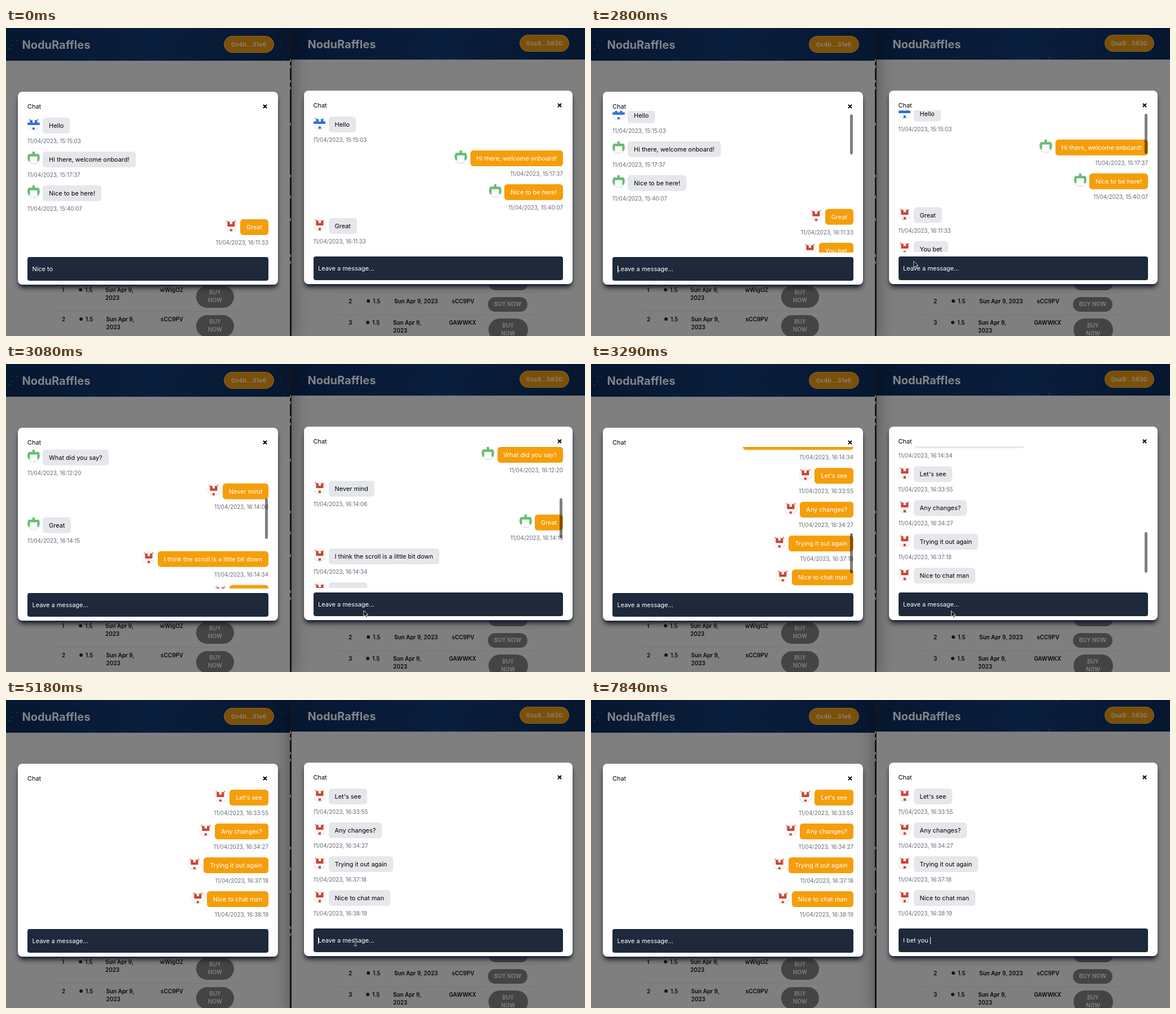
Animation of 1026 by 546 pixels, one loop 8 s. Source, as an HTML page with a canvas:

```html
<!DOCTYPE html>
<html lang="en">
<head>
<meta charset="utf-8">
<title>Chat in two windows</title>
<style>
html, body { margin: 0; width: 100%; height: 100%; overflow: hidden; }
body { position: relative; background: #1d1d1f; font: 10.93px/20px Inter, "Open Sans", sans-serif; color: #000; }
div, svg, canvas { position: absolute; }
.window { top: 0; height: 546px; overflow: hidden; background: #7f7f7f; box-shadow: 0 0 10px rgba(0,0,0,.25); }
.active { z-index: 1; box-shadow: 0 8px 32px rgba(0,0,0,.45); }
.text { white-space: pre; }
.brand { font-size: 20px; font-weight: 700; color: #828488; }
.wallet { box-sizing: border-box; height: 30px; border: 1px solid #80693f; border-radius: 15px; background: #7c5006;
  color: #828282; font-weight: 600; line-height: 28px; text-align: center; }
.cell { font-size: 9.9px; font-weight: 600; line-height: 14px; color: #080808; }
.coin { width: 6px; height: 6px; border-radius: 50%; background: #151515; }
.buy { border-radius: 20px; background: #444; color: #828282; font-size: 9.8px; font-weight: 600; line-height: 14px;
  display: flex; align-items: center; justify-content: center; text-align: center; white-space: pre; }
.rule { height: 1px; background: #777; }
.panel { height: 342.5px; border-radius: 8px; background: #fff;
  box-shadow: 0 7px 10px -2px #111a2e, 0 3px 5px -3px #111a2e; }
.list { left: 17px; top: 34.5px; height: 251px; overflow: hidden; }
.rows { left: 0; top: 11.5px; width: 100%; }
.row { left: 0; width: 100%; height: 60px; }
.line { left: 0; top: 0; display: flex; gap: 5.4px; }
.own .line, .own .time { left: auto; right: 0; }
.line svg { position: static; border-radius: 50%; box-shadow: 0 1px 2px rgba(0,0,0,.2); flex: none; }
.bubble { position: static; padding: 0 10.9px; border-radius: 5.4px; background: #e5e7eb; line-height: 28px; white-space: pre; }
.own .bubble { background: #f59e0b; color: #fff; }
.time { left: 0; top: 31px; font-size: 9.83px; color: #666b74; white-space: pre; }
.thumb { right: 1.5px; width: 5px; height: 71.5px; border-radius: 3px; background: rgba(0,0,0,.5); }
.field { left: 17px; top: 293.5px; height: 42px; border-radius: 4px; background: #1e293b; color: #fff;
  line-height: 42px; white-space: pre; padding-left: 8.5px; box-sizing: border-box; }
.caret { display: inline-block; position: static; width: 1px; height: 13px; margin-right: -1px; vertical-align: -3px; background: #fff; }
.scrap { z-index: 2; left: 503px; width: 2px; background: #6c6c6f; }
#pointer { z-index: 3; left: -12px; top: -12px; overflow: visible; }
</style>
</head>
<body>
<script>
const LOOP = 8000, STEP = 70, PITCH = 60, MAX_SCROLL = 9 * PITCH;
const SEND = 2730, FOCUS = 4410;
const PLACEHOLDER = 'Leave a message...';

const ICONS = {
  blue: ['#2f6fd6', 'X...X .X.X. XXXXX ..... ..X..'],
  green: ['#67bd70', '..X.. XXXXX X...X X...X .....'],
  red: ['#cc4433', 'X...X .X.X. .XXX. ..... ..X..']
};

const MESSAGES = [
  ['blue', 'Hello', '15:15:03'],
  ['green', 'Hi there, welcome onboard!', '15:17:37'],
  ['green', 'Nice to be here!', '15:40:07'],
  ['red', 'Great', '16:11:33'],
  ['red', 'You bet', '16:11:48'],
  ['green', 'What did you say?', '16:12:20'],
  ['red', 'Never mind', '16:14:06'],
  ['green', 'Great', '16:14:15'],
  ['red', 'I think the scroll is a little bit down', '16:14:34'],
  ['red', "Let's see", '16:33:55'],
  ['red', 'Any changes?', '16:34:27'],
  ['red', 'Trying it out again', '16:37:18'],
  ['red', 'Nice to chat man', '16:38:19']
];

function add(parent, cls, style = {}, text = '') {
  const el = document.createElement('div');
  el.className = cls;
  for (const [key, value] of Object.entries(style))
    el.style[key] = typeof value === 'number' ? value + 'px' : value;
  el.textContent = text;
  parent.append(el);
  return el;
}

function avatar(kind) {
  const [color, rows] = ICONS[kind];
  let path = '';
  rows.split(' ').forEach((row, y) => [...row].forEach((c, x) => {
    if (c === 'X') path += `M${x} ${y}h1v1h-1z`;
  }));
  return `<svg width="21.8" height="21.8" viewBox="0 0 5 5"><rect width="5" height="5" fill="#fafafa"/><path d="${path}" fill="${color}"/></svg>`;
}

function sky(parent, width, height, seed) {
  const canvas = document.createElement('canvas');
  canvas.width = width;
  canvas.height = height;
  parent.append(canvas);
  const g = canvas.getContext('2d');
  const fill = g.createLinearGradient(0, 0, width, height);
  fill.addColorStop(0, '#06172f');
  fill.addColorStop(.5, '#091e3d');
  fill.addColorStop(1, '#06172f');
  g.fillStyle = fill;
  g.fillRect(0, 0, width, height);
  const random = () => (seed = seed * 16807 % 2147483647) / 2147483647;
  for (let i = 0; i < 110; i++) {
    g.fillStyle = `rgba(95,130,175,${.08 + .4 * random() ** 3})`;
    g.beginPath();
    g.arc(random() * width, random() * height, .4 + .7 * random(), 0, 7);
    g.fill();
  }
}

function makeWindow(o) {
  const win = add(document.body, 'window', { left: o.x, width: o.w });
  sky(win, o.w, o.header, o.seed);
  add(win, 'text brand', { left: 28.5, top: o.header / 2 - 9.5 }, 'NoduRaffles');
  add(win, 'wallet', { left: o.walletX, top: o.walletY, width: 88.5 }, o.wallet);
  o.table(win);

  const panel = add(win, 'panel', { left: o.panelX, top: o.panelY, width: o.panelW });
  const inner = o.panelW - 34;
  add(panel, 'text', { left: 17, top: 16 }, 'Chat');
  panel.insertAdjacentHTML('beforeend',
    `<svg style="right:19px;top:22px" width="8" height="8"><path d="M1 1l6 6M7 1l-6 6" stroke="#000" stroke-width="2"/></svg>`);

  const list = add(panel, 'list', { width: inner });
  const rows = add(list, 'rows');
  MESSAGES.forEach(([who, text, time], i) => {
    const row = add(rows, 'row' + (who === o.owner ? ' own' : ''), { top: i * PITCH });
    const line = add(row, 'line');
    line.innerHTML = avatar(who);
    add(line, 'bubble', {}, text);
    add(row, 'time', {}, '11/04/2023, ' + time);
  });
  const thumb = add(list, 'thumb');

  const field = add(panel, 'field', { width: inner });
  const typed = document.createTextNode(''), hint = document.createTextNode('');
  const caret = document.createElement('span');
  caret.className = 'caret';
  field.append(typed, caret, hint);

  return {
    setActive(on) {
      win.classList.toggle('active', on);
    },
    setScroll(y, opacity) {
      rows.style.transform = `translateY(${-y}px)`;
      thumb.style.top = .4 + y * .2955 + 'px';
      thumb.style.opacity = opacity;
    },
    setField(text, caretOn) {
      typed.data = text;
      hint.data = text ? '' : PLACEHOLDER;
      caret.style.visibility = caretOn ? 'visible' : 'hidden';
    }
  };
}

function tableRow(win, y, xs, [num, date, code]) {
  const cell = (x, text) => add(win, 'text cell', { left: x, top: y - 7 }, text);
  cell(xs[0], num);
  add(win, 'coin', { left: xs[1], top: y - 3 });
  cell(xs[1] + 11, '1.5');
  cell(xs[2], date);
  cell(xs[3], code);
}

const buy = (win, left, top, width, height, text) => add(win, 'buy', { left, top, width, height }, text);

const left = makeWindow({
  x: 0, w: 503, header: 58, seed: 41,
  walletX: 386, walletY: 14, wallet: '0x4b...31e6',
  panelX: 21, panelY: 112.5, panelW: 461, owner: 'red',
  table(win) {
    tableRow(win, 463.5, [99, 129, 176, 273], ['1', 'Sun Apr 9,\n2023', 'wWIgOZ']);
    tableRow(win, 515.5, [99, 130, 177.5, 274], ['2', 'Sun Apr 9,\n2023', 'sCC9PV']);
    buy(win, 337, 456.5, 67, 39.5, 'BUY\nNOW');
    buy(win, 337, 508.5, 67, 39.5, 'BUY\nNOW');
    add(win, 'rule', { left: 88, top: 502, width: 328 });
  }
});

const right = makeWindow({
  x: 506, w: 520, header: 56, seed: 977,
  walletX: 403.5, walletY: 11.5, wallet: '0xa9...5830',
  panelX: 21.5, panelY: 111, panelW: 476.5, owner: 'green',
  table(win) {
    buy(win, 348.5, 439, 70, 26, 'BUY NOW');
    add(win, 'rule', { left: 76, top: 469, width: 360 });
    tableRow(win, 484, [101, 133, 182, 284], ['2', 'Sun Apr 9, 2023', 'sCC9PV']);
    buy(win, 348, 477, 70, 25.5, 'BUY NOW');
    add(win, 'rule', { left: 76, top: 508, width: 360 });
    tableRow(win, 522, [101, 132, 180, 279], ['3', 'Sun Apr 9,\n2023', 'GAWWKX']);
    buy(win, 349, 515, 69.5, 39.5, 'BUY\nNOW');
  }
});

// Slivers of the page behind, seen in the gap between the windows
[55, 66, 92, 104, 168, 260, 297, 337, 401, 413].forEach(y => add(document.body, 'scrap', { top: y, height: 5 }));

document.body.insertAdjacentHTML('beforeend', `
<svg id="pointer" width="24" height="24" viewBox="-12 -12 24 24">
  <path id="arrow" d="M0 0V10.6L2.5 8.4L4.2 12.2L6 11.4L4.3 7.7H7.7Z" fill="#000" stroke="#fff" stroke-width=".9"/>
  <g id="beam" fill="none"><path d="M-2.5-6Q0-6 0-4V4Q0 6-2.5 6M2.5-6Q0-6 0-4V4Q0 6 2.5 6M-1.5 2H1.5" stroke="#ddd" stroke-width="1.8"/>
  <path d="M-2.5-6Q0-6 0-4V4Q0 6-2.5 6M2.5-6Q0-6 0-4V4Q0 6 2.5 6M-1.5 2H1.5" stroke="#222" stroke-width=".8"/></g>
</svg>`);
const pointer = document.getElementById('pointer');
const arrow = document.getElementById('arrow');
const beam = document.getElementById('beam');

// time, x, y
const POINTER_PATH = [
  [2730, 555, 404], [2800, 572, 413.5], [2940, 612, 430], [3080, 634, 437], [3500, 643, 438],
  [3710, 649, 436], [3850, 649, 436], [4480, 631, 432], [4830, 631, 432], [5180, 619, 429.5]
];
const LEFT_KEYS = [140, 280, 420, 630, 840, 1050, 1120, 1330];
const RIGHT_KEYS = [5950, 6230, 6440, 6580, 6790, 7000, 7280, 7490, 7630, 7840];

const within = (t, a, b) => t >= a && t < b;
const clamp = v => Math.min(1, Math.max(0, v));
const pressed = (keys, t) => keys.filter(k => k <= t).length;

// cubic-bezier(.42, 0, .58, 1)
function easeInOut(x) {
  let lo = 0, hi = 1;
  for (let i = 0; i < 20; i++) {
    const s = (lo + hi) / 2;
    if (3 * s * (1 - s) * (1 - s) * .42 + 3 * s * s * (1 - s) * .58 + s ** 3 < x) lo = s; else hi = s;
  }
  return lo * lo * (3 - 2 * lo);
}

const scrollAt = (t, start) => t < SEND ? 0 : MAX_SCROLL * easeInOut(clamp((t - start) / 683));

function pointerAt(t) {
  const i = POINTER_PATH.findIndex(p => p[0] > t);
  if (i < 0) return POINTER_PATH.at(-1).slice(1);
  const [t0, x0, y0] = POINTER_PATH[Math.max(0, i - 1)], [t1, x1, y1] = POINTER_PATH[i];
  const k = t1 > t0 ? clamp((t - t0) / (t1 - t0)) : 0;
  return [x0 + (x1 - x0) * k, y0 + (y1 - y0) * k];
}

function draw(t) {
  left.setActive(t < FOCUS);
  right.setActive(t >= FOCUS);

  const bar = t < SEND ? 0 : 1 - clamp((t - 3850) / 350);
  left.setScroll(scrollAt(t, 2711), bar);
  right.setScroll(scrollAt(t, 2709), bar);

  const leftText = t < SEND ? 'Nice to chat man'.slice(0, 8 + pressed(LEFT_KEYS, t)) : '';
  left.setField(leftText, within(t, 140, 1890) || within(t, 2310, 2870) || within(t, 3360, 3920));
  right.setField('I bet you '.slice(0, pressed(RIGHT_KEYS, t)), within(t, 5110, 5600) || t >= 5950);

  const [x, y] = pointerAt(t);
  pointer.style.transform = `translate(${x}px, ${y}px)`;
  pointer.style.visibility = within(t, SEND, 5950) ? 'visible' : 'hidden';
  arrow.style.display = t < 4900 ? '' : 'none';
  beam.style.display = t < 4900 ? 'none' : '';
}

const began = performance.now();
function tick() {
  const t = (performance.now() - began) % LOOP;
  draw(Math.floor(t / STEP) * STEP);
  requestAnimationFrame(tick);
}
tick();
</script>
</body>
</html>
```
